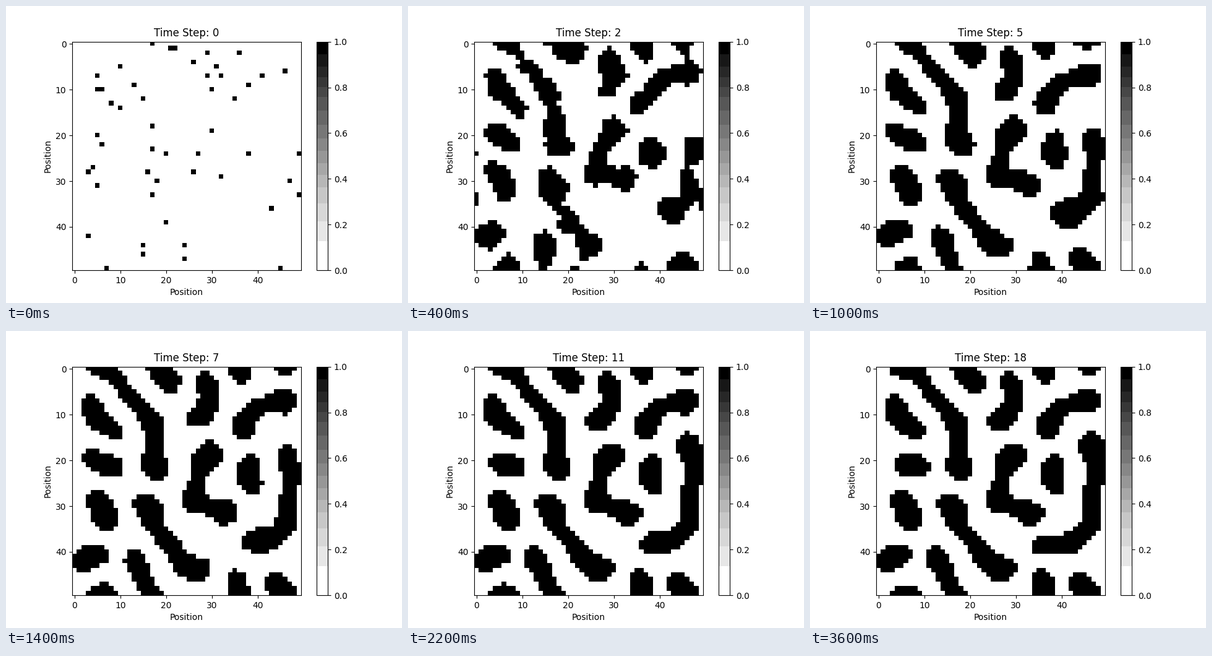
Write a matplotlib script that moves like this. It is 640x480 px and loops after 3.8 s.

```python
import numpy as np
import matplotlib.pyplot as plt
from matplotlib.animation import FuncAnimation
from matplotlib.colors import ListedColormap

SIZE, STEPS = 50, 19
R_ACT, R_INH = 3, 6
W_ACT, W_INH = 3, 1

# Cells that start the pattern, counted row by row from the top left
SEEDS = [17, 71, 72, 129, 136, 226, 260, 281, 346, 355, 379, 382, 391, 463,
         488, 505, 506, 530, 615, 635, 658, 710, 917, 980, 1005, 1106, 1167,
         1220, 1227, 1238, 1249, 1354, 1403, 1416, 1426, 1482, 1518, 1547,
         1555, 1667, 1699, 1843, 1970, 2103, 2215, 2224, 2315, 2374, 2457,
         2495]


def offsets(inner, outer):
    """Cell offsets whose distance d satisfies inner <= d < outer."""
    span = range(-outer, outer + 1)
    return [(dy, dx) for dy in span for dx in span
            if inner**2 <= dx * dx + dy * dy < outer**2]


ACTIVATOR = offsets(0, R_ACT)
INHIBITOR = offsets(R_ACT, R_INH)


def count(grid, cells):
    return sum(np.roll(grid, d, axis=(0, 1)) for d in cells)


def step(grid):
    """Short-range activation against long-range inhibition, periodic edges."""
    field = W_ACT * count(grid, ACTIVATOR) - W_INH * count(grid, INHIBITOR)
    return (field > 0).astype(int)


def banded_greys():
    """The Greys map reduced to sixteen flat bands."""
    level = np.round(plt.get_cmap("Greys")(np.arange(256))[:, 0] * 255)
    band = level // 16
    shade = np.where(band == 0, 0, np.where(band == 15, 255, band * 16 + 7))
    return ListedColormap(np.repeat(shade[:, None] / 255, 3, axis=1))


start = np.zeros((SIZE, SIZE), dtype=int)
start.flat[SEEDS] = 1

states = [start]
for _ in range(STEPS - 1):
    states.append(step(states[-1]))

fig, ax = plt.subplots(figsize=(6.4, 4.8), dpi=100)
image = ax.imshow(start, cmap=banded_greys(), vmin=0, vmax=1,
                  interpolation="nearest")
fig.colorbar(image, ax=ax)
ax.set_xlabel("Position")
ax.set_ylabel("Position")
title = ax.set_title("Time Step: 0")


def update(i):
    image.set_data(states[i])
    title.set_text(f"Time Step: {i}")
    return image, title


anim = FuncAnimation(fig, update, frames=STEPS, interval=200,
                     repeat=True, repeat_delay=0, blit=False)
plt.show()
```
